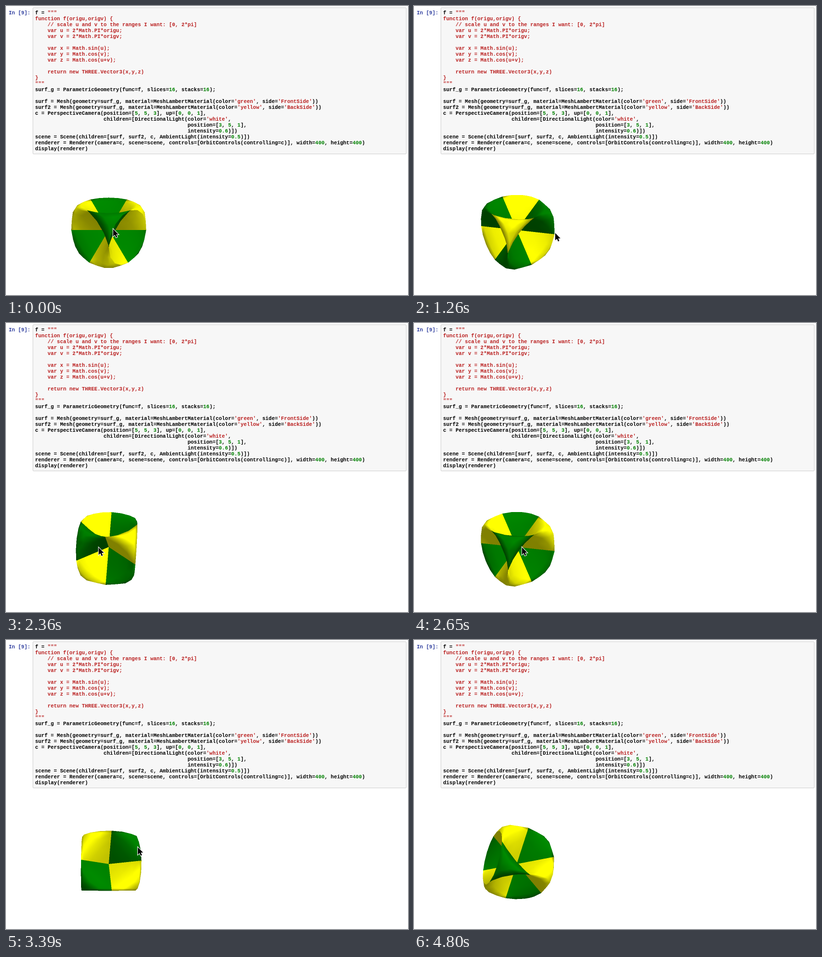
Animation of 814x587 px, one loop 5.2 s. Source, as an HTML page with a canvas:

```html
<!DOCTYPE html>
<html lang="en">
<head>
<meta charset="utf-8">
<title>Parametric surface</title>
<style>
  html, body { margin: 0; width: 100%; height: 100%; overflow: hidden; background: #fff; }
  pre { position: absolute; margin: 0; font: bold 10.5px/12px "Liberation Mono", monospace; color: #000; }
  #prompt { left: 5.5px; top: 8px; color: #303f9f; }
  #cell { box-sizing: border-box; left: 54px; top: 3px; width: 757px; height: 298px; padding: 4px 0 0 4px;
    background: #f7f7f7; border: 1px solid #cfcfcf; border-radius: 2px; }
  .str { color: #ba2121; }
  .num { color: #008000; }
  canvas { position: absolute; left: 0; top: 0; }
</style>
</head>
<body>
<pre id="prompt">In [9]:</pre>
<pre id="cell">f = """
function f(origu,origv) {
    // scale u and v to the ranges I want: [0, 2*pi]
    var u = 2*Math.PI*origu;
    var v = 2*Math.PI*origv;

    var x = Math.sin(u);
    var y = Math.cos(v);
    var z = Math.cos(u+v);

    return new THREE.Vector3(x,y,z)
}
"""
surf_g = ParametricGeometry(func=f, slices=16, stacks=16);

surf = Mesh(geometry=surf_g, material=MeshLambertMaterial(color='green', side='FrontSide'))
surf2 = Mesh(geometry=surf_g, material=MeshLambertMaterial(color='yellow', side='BackSide'))
c = PerspectiveCamera(position=[5, 5, 3], up=[0, 0, 1],
                      children=[DirectionalLight(color='white',
                                                 position=[3, 5, 1],
                                                 intensity=0.6)])
scene = Scene(children=[surf, surf2, c, AmbientLight(intensity=0.5)])
renderer = Renderer(camera=c, scene=scene, controls=[OrbitControls(controlling=c)], width=400, height=400)
display(renderer)</pre>
<canvas id="stage" width="814" height="587"></canvas>
<script>
const cell = document.getElementById('cell');
cell.innerHTML = cell.textContent.replace(/"""[^]*?"""|'[^']*'|\b\d+(\.\d+)?/g,
  token => `<span class="${/\d/.test(token[0]) ? 'num' : 'str'}">${token}</span>`);

const LOOP = 5200;
// Runs of evenly spaced picture changes: first, last, count
const RUNS = [[300, 820, 9], [870, 1370, 10], [1430, 1540, 3], [1780, 2000, 5], [2240, 2710, 9],
  [2770, 3280, 10], [3340, 3860, 10], [4160, 4390, 5], [4570, 4800, 5]];
// Time, camera azimuth and elevation in degrees
const ORBIT = [[240, 45, 22.99], [755, 11.3, 36.5], [1260, -33.5, 33], [1370, -46, 33], [1540, -56, 32],
  [2180, -56, 32], [2360, -84, 32], [2940, -163.3, 33.5], [3280, -183, -4], [3800, -205.5, -33]];
// Time and pointer tip
const POINTER = [[240, 217, 453], [755, 247, 464], [1260, 286, 461], [1370, 298, 461], [1540, 307, 461],
  [1725, 307, 461], [2000, 160, 457], [2180, 160, 457], [2360, 188, 456], [2940, 249, 455],
  [3280, 265, 424], [3800, 282, 397], [4102, 282, 397], [4160, 310, 402], [4217, 416, 424],
  [4275, 600, 480], [4332, 705, 516], [4390, 720, 528], [4512, 720, 528], [4743, 778, 576], [4800, 790, 600]];

function heldTime(t) {
  let held = 0;
  for (const [first, last, count] of RUNS) {
    const gap = (last - first) / (count - 1);
    const step = Math.floor((t - first + 4) / gap);
    if (step >= 0) held = first + Math.min(step, count - 1) * gap;
  }
  return held;
}

function sample(keys, t) {
  if (t <= keys[0][0]) return keys[0].slice(1);
  const next = keys.findIndex(key => key[0] > t);
  if (next < 0) return keys[keys.length - 1].slice(1);
  const a = keys[next - 1], b = keys[next], k = (t - a[0]) / (b[0] - a[0]);
  return [1, 2].map(i => a[i] + (b[i] - a[i]) * k);
}

const dot = (a, b) => a[0] * b[0] + a[1] * b[1] + a[2] * b[2];
const sub = (a, b) => a.map((n, i) => n - b[i]);
const cross = (a, b) => [a[1] * b[2] - a[2] * b[1], a[2] * b[0] - a[0] * b[2], a[0] * b[1] - a[1] * b[0]];
const unit = a => { const n = Math.hypot(...a) || 1; return a.map(x => x / n); };

// Surface mesh with area-weighted vertex normals
const N = 16, points = [], faces = [];
for (let i = 0; i <= N; i++) for (let j = 0; j <= N; j++) {
  const u = 2 * Math.PI * j / N, v = 2 * Math.PI * i / N;
  points.push([Math.sin(u), Math.cos(v), Math.cos(u + v)]);
}
for (let i = 0; i < N; i++) for (let j = 0; j < N; j++) {
  const a = i * (N + 1) + j, d = a + N + 1;
  faces.push([a, a + 1, d], [a + 1, d + 1, d]);
}
const sums = points.map(() => [0, 0, 0]);
for (const [a, b, c] of faces) {
  const n = cross(sub(points[b], points[a]), sub(points[c], points[a]));
  for (const i of [a, b, c]) sums[i] = sums[i].map((x, k) => x + n[k]);
}
const normals = sums.map(unit);

// Depth-buffered drawing at double resolution
const CENTER = [208, 455], RADIUS = 88, SCALE = 2, SIZE = 2 * RADIUS * SCALE;
const DISTANCE = Math.sqrt(59), FOCAL = 150 / Math.tan(Math.PI / 9);
const buffer = document.createElement('canvas');
buffer.width = buffer.height = SIZE;
const bufferCtx = buffer.getContext('2d');
const image = bufferCtx.createImageData(SIZE, SIZE);
const depth = new Float32Array(SIZE * SIZE);

function fillTriangle(a, b, c) {
  const area = (b.x - a.x) * (c.y - a.y) - (b.y - a.y) * (c.x - a.x);
  if (!area) return;
  const front = area < 0;
  const [la, lb, lc] = [a, b, c].map(p => 0.5 + 0.6 * Math.max(0, front ? p.light : -p.light));
  const x0 = Math.ceil(Math.min(a.x, b.x, c.x) - 0.5), x1 = Math.max(a.x, b.x, c.x) - 0.5;
  const y0 = Math.ceil(Math.min(a.y, b.y, c.y) - 0.5), y1 = Math.max(a.y, b.y, c.y) - 0.5;
  for (let y = y0; y <= y1; y++) for (let x = x0; x <= x1; x++) {
    const dx = x + 0.5 - a.x, dy = y + 0.5 - a.y;
    const kb = (dx * (c.y - a.y) - dy * (c.x - a.x)) / area;
    const kc = (dy * (b.x - a.x) - dx * (b.y - a.y)) / area;
    const ka = 1 - kb - kc;
    if (ka < 0 || kb < 0 || kc < 0) continue;
    const near = ka * a.near + kb * b.near + kc * c.near, i = y * SIZE + x;
    if (near <= depth[i]) continue;
    depth[i] = near;
    const light = ka * la + kb * lb + kc * lc;
    image.data[i * 4] = front ? 0 : 255 * light;
    image.data[i * 4 + 1] = (front ? 128 : 255) * light;
    image.data[i * 4 + 3] = 255;
  }
}

function renderSurface(azimuth, elevation) {
  const [ca, sa, ce, se] = [azimuth, elevation].flatMap(deg => {
    const r = deg * Math.PI / 180;
    return [Math.cos(r), Math.sin(r)];
  });
  const toward = [ce * ca, ce * sa, se], right = [-sa, ca, 0], up = [-se * ca, -se * sa, ce];
  // The light rides on the camera and aims at the origin
  const lamp = unit(toward.map((n, i) => 3 * right[i] + 5 * up[i] + (DISTANCE + 1) * n));
  const projected = points.map((p, i) => {
    const near = 1 / (DISTANCE - dot(p, toward));
    return {
      x: SCALE * (RADIUS + dot(p, right) * FOCAL * near),
      y: SCALE * (RADIUS - dot(p, up) * FOCAL * near),
      near, light: dot(normals[i], lamp)
    };
  });
  image.data.fill(0);
  depth.fill(0);
  for (const face of faces) fillTriangle(...face.map(i => projected[i]));
  bufferCtx.putImageData(image, 0, 0);
}

const ctx = document.getElementById('stage').getContext('2d');
ctx.imageSmoothingQuality = 'high';
const arrow = new Path2D('M0 0V15L3.5 11.8L5.9 17.2L8.4 16.1L6.1 10.9H10.6Z');

function drawPointer(x, y) {
  ctx.save();
  ctx.translate(x, y);
  ctx.lineWidth = 2;
  ctx.strokeStyle = '#fff';
  ctx.stroke(arrow);
  ctx.fillStyle = '#000';
  ctx.fill(arrow);
  ctx.restore();
}

let shown = -1;
function frame(now) {
  const t = heldTime(now % LOOP);
  if (t !== shown) {
    shown = t;
    renderSurface(...sample(ORBIT, t));
    ctx.clearRect(0, 0, 814, 587);
    ctx.drawImage(buffer, CENTER[0] - RADIUS, CENTER[1] - RADIUS, 2 * RADIUS, 2 * RADIUS);
    drawPointer(...sample(POINTER, t));
  }
  requestAnimationFrame(frame);
}
requestAnimationFrame(frame);
</script>
</body>
</html>
```
